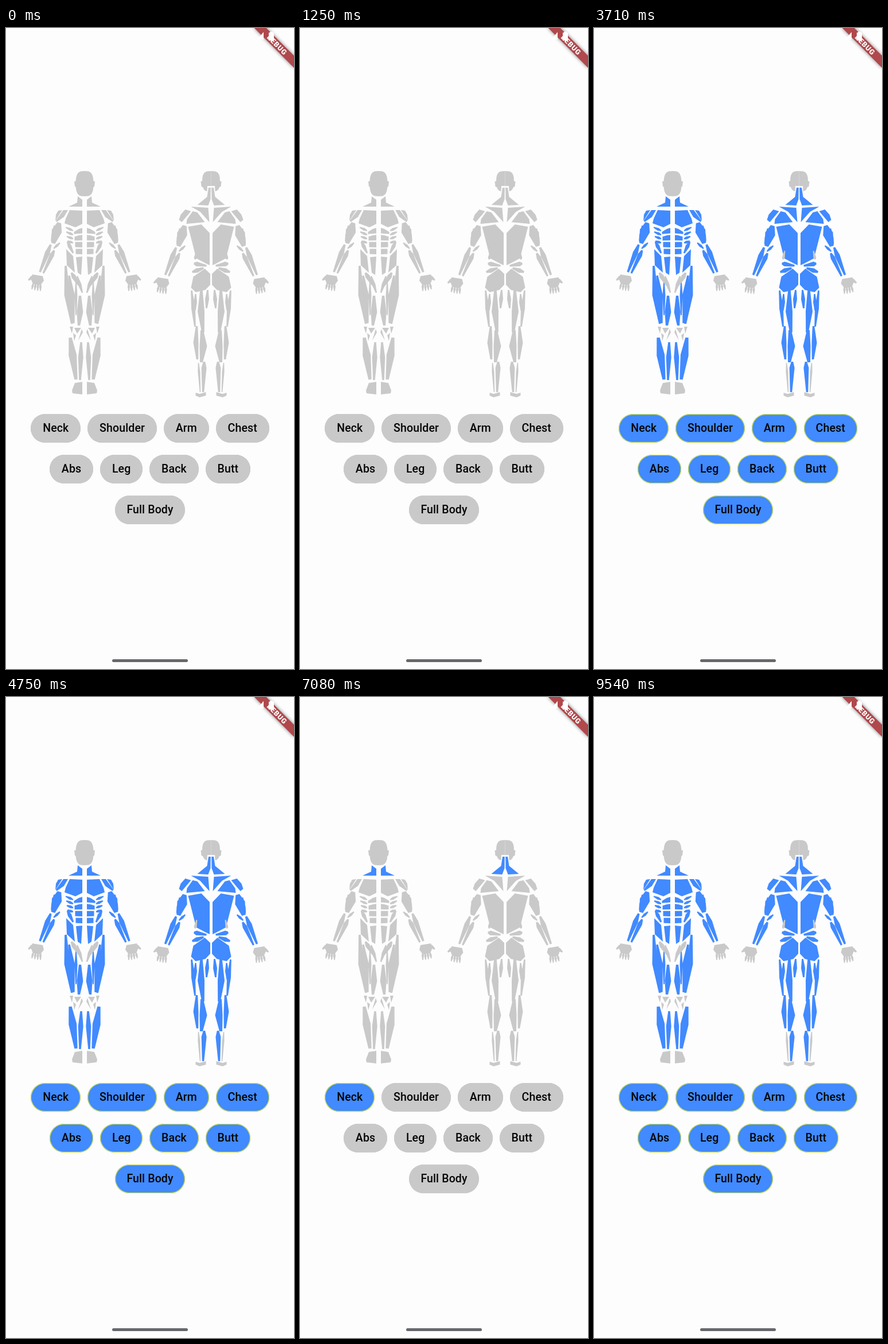
An HTML page that plays this animation: 502 px wide and 1116 px high, repeating every 9.62 s.

```html
<!DOCTYPE html>
<html lang="en">
<head>
<meta charset="utf-8">
<title>Muscle picker</title>
<style>
  html, body { margin: 0; width: 100%; height: 100%; overflow: hidden; background: #fdfdfd; }
  body { position: relative; }
  svg { display: block; width: 502px; height: 1116px; }
  svg text { font: 900 12.4px Roboto, sans-serif; letter-spacing: .8px; text-anchor: middle; fill: #fff; }
  #chips {
    position: absolute; left: 19px; top: 672px; width: 464px;
    display: flex; flex-wrap: wrap; justify-content: center; gap: 21.5px 12.2px;
  }
  #chips span {
    box-sizing: border-box; height: 49.5px; padding: 0 20.75px; border-radius: 25px;
    font: 500 19.52px/49.5px Roboto, sans-serif; letter-spacing: .12px; color: #050505;
  }
</style>
</head>
<body>
<svg viewBox="0 0 502 1116" xmlns="http://www.w3.org/2000/svg">
  <defs>
    <filter id="soft" x="-20%" y="-100%" width="140%" height="300%"><feGaussianBlur stdDeviation="3"/></filter>
  </defs>
  <g id="bodies"></g>
  <g transform="translate(502 0) rotate(45)">
    <rect x="-49" y="34.2" width="98" height="14.7" opacity=".5" filter="url(#soft)"/>
    <rect x="-60" y="34.2" width="120" height="14.7" fill="#b0484c"/>
    <text y="46">DEBUG</text>
  </g>
  <path d="M449 7V20H438Z M458 8H460V6.500H465V8H467V22H458Z" fill="#fff"/>
  <rect x="185" y="1099" width="132" height="5" rx="2.500" fill="#66686c"/>
</svg>
<div id="chips"></div>
<script>
const LOOP = 9620, FADE = 150;
const GRAY = [201, 201, 201], BLUE = [65, 138, 255], LIME = [205, 222, 70];
const LABELS = ["Neck", "Shoulder", "Arm", "Chest", "Abs", "Leg", "Back", "Butt", "Full Body"];

const svgEl = (parent, tag, attrs) => {
  const el = document.createElementNS("http://www.w3.org/2000/svg", tag);
  for (const k in attrs) el.setAttribute(k, attrs[k]);
  return parent.appendChild(el);
};
const mix = (a, b, p) => `rgb(${a.map((v, i) => Math.round(v + (b[i] - v) * p))})`;
const repeat = (n, f) => Array.from({ length: n }, (_, i) => f(i)).join("");

// Shapes use x as the distance from the body's axis; each is drawn on both sides.
const poly = (...xy) => `M${xy.join(" ")}Z`;

// A muscle belly from one tendon to the other, w wide at fraction `at`, bowed outward.
function belly(x1, y1, x2, y2, w, at = .5, bow = 0) {
  const len = Math.hypot(x2 - x1, y2 - y1);
  const nx = (y2 - y1) / len, ny = (x1 - x2) / len;
  const rim = [[0, .38], [at, 1], [1, .38]].map(([t, k]) => {
    const x = x1 + (x2 - x1) * t + (t === at ? bow : 0), y = y1 + (y2 - y1) * t;
    return { x, y, h: w * k / 2 };
  });
  const side = s => rim.map(p => [p.x + s * nx * p.h, p.y + s * ny * p.h]);
  return poly(...side(1).flat(), ...side(-1).reverse().flat());
}

// Half of a rounded box, with an ear.
function head(rx, ry) {
  const cy = 249 + ry, n = 12, pts = [];
  for (let i = 0; i <= n; i++) {
    const a = Math.PI * i / n - Math.PI / 2;
    const c = Math.max(0, Math.cos(a)), s = Math.sin(a);
    pts.push(rx * c ** .6, cy + ry * Math.sign(s) * Math.abs(s) ** .75);
  }
  return poly(...pts) + poly(rx - 3, 266, rx + 2.5, 267, rx + 1.5, 276, rx - 3, 278);
}

const muscles = [];
function makeBody(axis) {
  const root = document.getElementById("bodies");
  return (id, shapes, dx = 0, dy = 0) => {
    const g = svgEl(root, "g", {});
    for (const side of [-1, 1])
      svgEl(g, "path", { d: shapes.join(""), transform: `matrix(${side} 0 0 1 ${axis + side * dx} ${dy})` });
    muscles.push({ id, g });
  };
}

function addArm(part, dx, dy) {
  part("Arm", [
    belly(44, 339, 55, 375, 18, .4),
    belly(53, 344, 58, 371, 4, .6),
    belly(59, 377, 78, 425, 9, .3),
    belly(53, 387, 72, 427, 8, .2),
    belly(43, 374, 54, 384, 5)
  ], dx, dy);
  part("Hand", [
    poly(73, 432, 91, 429, 94, 436, 90, 446, 77, 448, 71, 440),
    repeat(4, i => belly(77 + 4 * i, 443, 77 + 5 * i, 458 - i * i / 3, 4)),
    belly(89, 432, 98, 439, 6, .3)
  ], dx, dy);
}

function addFront(part) {
  part("Head", [head(15.5, 22)]);
  part("Neck", [poly(4, 299, 12, 293, 13, 304, 28, 311, 4, 311)]);
  part("Shoulder", [
    poly(29, 317, 37, 317, 50, 335, 49, 338, 36, 329),
    poly(39, 317, 46, 318, 50, 325, 51, 336)
  ]);
  part("Chest", [poly(4, 318, 26, 317, 33, 332, 35, 340, 16, 347, 4, 341)]);
  part("Abs", [
    repeat(4, i => {
      const y = 348 + 12.2 * i, drop = Math.max(0, 7 - 4 * i), out = 18.5 - i;
      return poly(4, y, 10, y + drop / 4, out, y + drop, out, y + 9 + drop / 4, 4, y + 9.5);
    }),
    poly(4, 398, 15, 399, 12, 426, 6, 430),
    poly(32, 385, 20, 397, 17, 426, 31, 413),
    repeat(4, i => belly(20, 353 + 7 * i, 33 - i, 347 + 8 * i, 5, .4)),
    belly(30, 372, 20, 392, 7, .4)
  ]);
  part("Leg", [
    belly(33, 414, 22, 515, 10, .5, 3),
    belly(27, 431, 19, 514, 9, .4, -2),
    belly(15, 443, 15, 500, 5, .4),
    belly(8, 466, 10, 518, 11, .55, -1),
    belly(25, 539, 15, 612, 14, .42),
    belly(6, 547, 8, 613, 9, .4)
  ]);
  part("Joints", [
    belly(23, 426, 10, 448, 8, .3),
    belly(13, 432, 4, 461, 6),
    poly(26, 520, 20, 520, 22, 532),
    poly(18, 522, 6, 522, 13, 532),
    poly(20, 531, 15, 535, 18, 545),
    poly(5, 524, 3, 530, 11, 544),
    poly(17, 618, 4, 616, 4, 638, 21, 636, 22, 631)
  ]);
  addArm(part, 0, 0);
}

function addBack(part) {
  part("Head", [head(15.5, 18)]);
  part("Gap", [poly(0, 275, 6.5, 275, 7.5, 290, 0, 290)]);
  part("Neck", [poly(.8, 278, 4.5, 278, 7, 294, 24, 308, 5, 309, 1, 298)]);
  part("Shoulder", [poly(45, 316, 35, 319, 51, 338, 56, 334, 53, 325)]);
  part("Back", [
    poly(35, 311, 5, 313, 3, 338, 19, 320),
    poly(32, 319, 24, 321, 11, 338, 43, 341, 42, 333),
    poly(40, 346, 17, 342, 2.5, 357, 2.5, 413, 9, 410, 26, 401),
    belly(30, 410, 8, 414, 8, .2)
  ]);
  part("Butt", [
    belly(33, 425, 13, 418, 8, .4),
    poly(31, 433, 11, 419, 1.5, 428, 1.5, 447, 10, 456, 27, 460, 35, 452)
  ]);
  part("Leg", [
    belly(34, 457, 28, 520, 7),
    belly(27, 463, 28, 492, 6),
    belly(17, 457, 14, 530, 12, .5, 2),
    belly(6, 456, 8, 488, 7),
    belly(25, 519, 24, 577, 9, .5, 2),
    belly(16, 526, 17, 582, 13, .5, -3),
    belly(12, 581, 14, 634, 9, .2)
  ]);
  part("Joints", [
    belly(25, 388, 28, 403, 5, .8),
    belly(22, 583, 19, 634, 4, .3),
    poly(27, 635, 20, 637, 9, 634, 9, 640, 20, 643, 27, 640)
  ]);
  addArm(part, 2, 5);
}

addFront(makeBody(137));
addBack(makeBody(357.5));

const chips = LABELS.map(id => {
  const el = document.createElement("span");
  el.textContent = id;
  document.getElementById("chips").append(el);
  return { id, el };
});

const taps = [
  { at: 2850, ids: LABELS, on: 1 },
  { at: 5900, ids: LABELS, on: 0 },
  { at: 6300, ids: ["Neck"], on: 1 },
  { at: 7200, ids: ["Shoulder"], on: 1 },
  { at: 8530, ids: LABELS, on: 1 }
];

function selection(id, t) {
  let on = 0, level = 0;
  for (const tap of taps) {
    if (t < tap.at || !tap.ids.includes(id)) continue;
    const p = Math.min(1, (t - tap.at) / FADE);
    level = on + (tap.on - on) * p * p * (3 - 2 * p);
    on = tap.on;
  }
  return { on, level };
}

function draw(t) {
  for (const { id, g } of muscles)
    g.setAttribute("fill", id === "Gap" ? "#fdfdfd" : mix(GRAY, BLUE, selection(id, t).on));
  for (const { id, el } of chips) {
    const { level } = selection(id, t);
    el.style.background = mix(GRAY, BLUE, level);
    el.style.boxShadow = `inset 0 0 0 1.2px ${mix(GRAY, LIME, level)}`;
  }
}

const start = performance.now();
function tick() {
  draw((performance.now() - start) % LOOP);
  requestAnimationFrame(tick);
}
tick();
</script>
</body>
</html>
```
